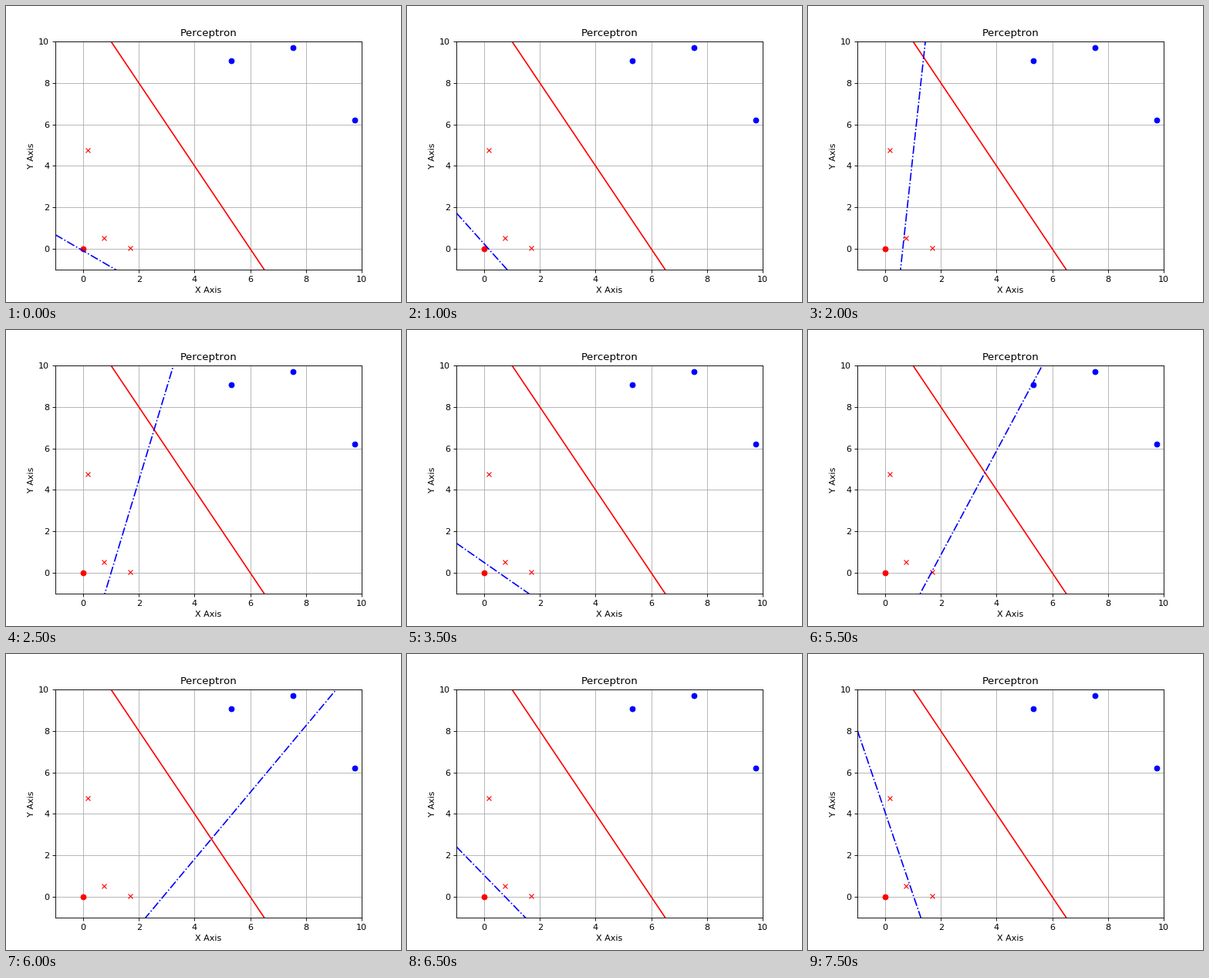
Write a matplotlib script that moves like this. It is 512 px wide and 384 px high and loops after 8000 ms.

```python
import matplotlib.pyplot as plt
import numpy as np
from matplotlib.animation import FuncAnimation

FRAMES = 16

# samples of the two classes, in training order
LOW = [(0.17, 4.77), (0.755, 0.51), (1.695, 0.025)]
HIGH = [(7.54, 9.69), (5.32, 9.07), (9.757, 6.19)]


def train(steps):
    """Perceptron weights (bias, wx, wy) after each correction."""
    samples = [(p, 0) for p in LOW] + [(p, 1) for p in HIGH]
    w = np.zeros(3)
    history = []
    while len(history) < steps:
        for (x, y), label in samples:
            p = np.array([1.0, x, y])
            error = label - int(w @ p > 0)
            if error:
                w = w + error * p
                history.append(w)
    return history[:steps]


weights = train(FRAMES)

plt.rcParams["font.family"] = "DejaVu Sans"
plt.rcParams["text.kerning_factor"] = 6
fig, ax = plt.subplots(figsize=(6.4, 4.8), dpi=80)
ax.set(xlim=(-1, 10), ylim=(-1, 10), title="Perceptron",
       xlabel="X Axis", ylabel="Y Axis")
ax.grid(True)

xs = np.array([-1.0, 10.0])
ax.plot(xs, 12 - 2 * xs, "r-")
ax.plot(0, 0, "ro")
ax.plot(*zip(*LOW), "rx")
ax.plot(*zip(*HIGH), "bo")
boundary, = ax.plot([], [], "b-.")


def update(i):
    b, wx, wy = weights[i]
    boundary.set_data(xs, -(b + wx * xs) / wy)
    return boundary,


anim = FuncAnimation(fig, update, frames=FRAMES, interval=500, repeat=True)
plt.show()
```
